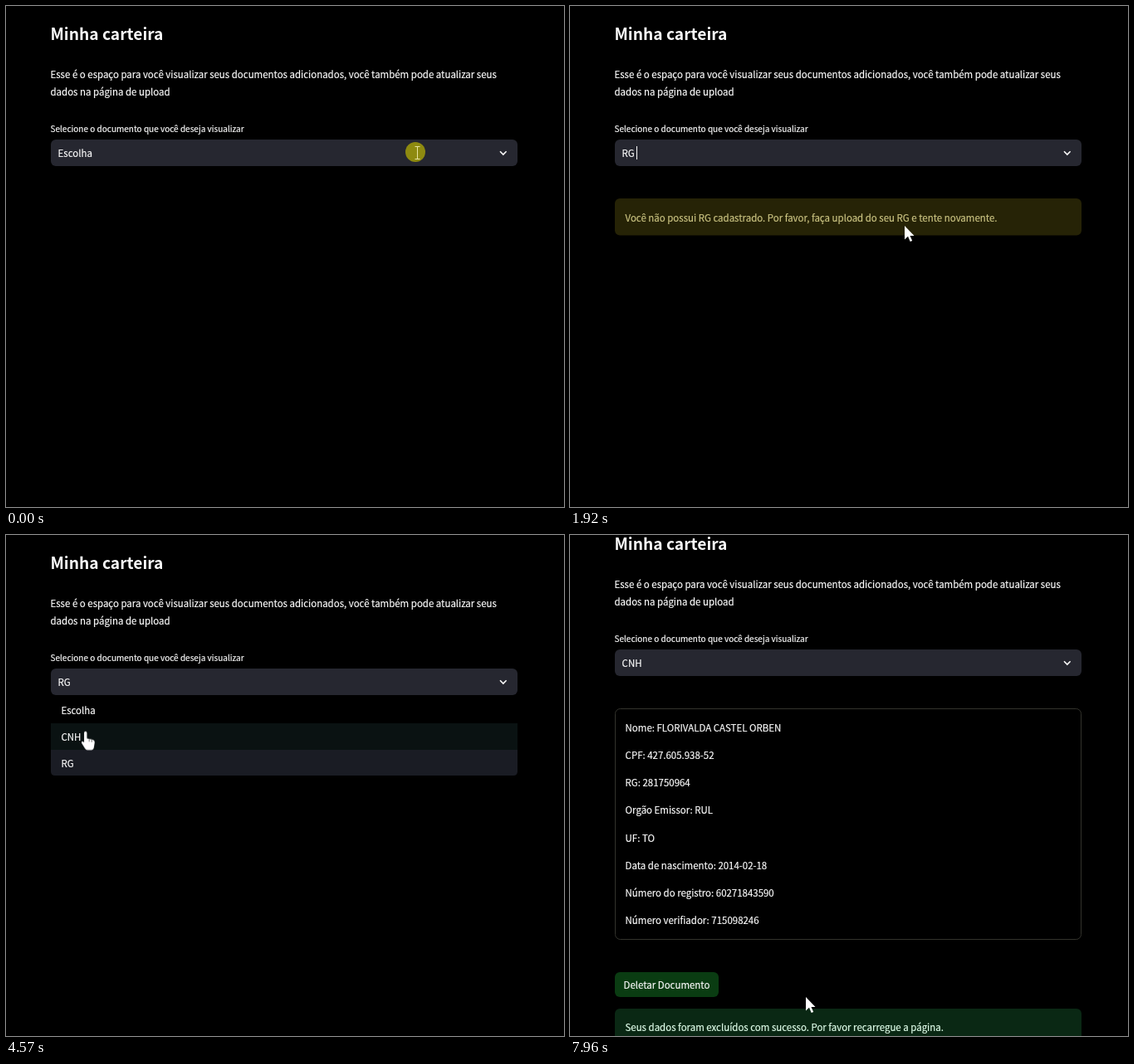
An HTML page that plays this animation: 672x604 px, repeating every 8 s.

```html
<!DOCTYPE html>
<html lang="pt-BR">
<head>
<meta charset="utf-8">
<title>Minha carteira</title>
<style>
html, body { margin: 0; width: 100%; height: 100%; overflow: hidden; background: #000; }
svg { display: block; width: 100%; height: 100%; }
text {
  font: 11.46px "Noto Sans CJK JP", "Noto Sans CJK SC", "Noto Sans CJK KR", "Noto Sans", sans-serif;
  color: #fafafa; fill: currentColor; stroke: currentColor; stroke-width: .2; white-space: pre;
}
.title { font-size: 19.2px; font-weight: 700; stroke: none; }
.small { font-size: 10.03px; }
.field { fill: #262730; }
.line { fill: none; stroke: #fafafa; }

/* Switched parts: hard on and off within the 8 s loop */
.timed { animation: 8s step-end infinite; }
.choose { animation-name: choose; }
.rg { animation-name: rg; }
.cnh { animation-name: cnh; }
.caret { animation-name: caret; }
.popup { animation-name: popup; }
.row-cnh { animation-name: row-cnh; fill: #0a1212; }
.row-rg { animation-name: row-rg; fill: #1a1c24; }
.warning { animation-name: warning; }
.details { animation-name: details; }
.tooltip { animation-name: tooltip; }
.success { animation-name: success; }
.press { animation-name: press; fill: #8e8a10; }
.ibeam { animation-name: ibeam; }
.hand { animation-name: hand; }
.arrow { animation-name: arrow; }
.button { animation-name: button; }

@keyframes choose { 0% { opacity: 1 } 18.5%, 100% { opacity: 0 } }
@keyframes rg { 0%, 63.5%, 100% { opacity: 0 } 18.5% { opacity: 1 } }
@keyframes cnh { 0% { opacity: 0 } 63.5%, 100% { opacity: 1 } }
@keyframes caret { 0%, 27.3%, 39.9%, 100% { opacity: 0 } 21.1%, 33.6% { opacity: 1 } }
@keyframes popup { 0%, 18.5%, 63.5%, 100% { opacity: 0 } 2%, 49% { opacity: 1 } }
@keyframes row-cnh { 0%, 18.5%, 100% { opacity: 0 } 8.9%, 55.6% { opacity: 1 } }
@keyframes row-rg { 0% { opacity: 0 } 12.7%, 100% { opacity: 1 } }
@keyframes warning { 0%, 65%, 100% { opacity: 0 } 22.3% { opacity: 1 } }
@keyframes details { 0% { opacity: 0 } 67%, 100% { opacity: 1 } }
@keyframes tooltip { 0%, 90.4%, 100% { opacity: 0 } 81.3% { opacity: 1 } }
@keyframes success { 0% { opacity: 0 } 86.2%, 100% { opacity: 1 } }
@keyframes press {
  0%, 16.9%, 47.2%, 61.5%, 84.7% { opacity: 1 }
  2%, 18.5%, 49%, 63.1%, 86.2%, 100% { opacity: 0 }
}
@keyframes ibeam { 0%, 40.5% { opacity: 1 } 5.4%, 51.6%, 100% { opacity: 0 } }
@keyframes hand { 0%, 18.5%, 63.1%, 89.4%, 100% { opacity: 0 } 5.4%, 51.6%, 80.4% { opacity: 1 } }
@keyframes arrow { 0%, 40.5%, 80.4% { opacity: 0 } 18.5%, 63.1%, 89.4%, 100% { opacity: 1 } }
@keyframes button { 0% { fill: #0a4a12 } 80.4% { fill: #06260a } 89.4%, 100% { fill: #0a3c12 } }

/* Parts that move or fade */
.warning rect { animation: warn-box 8s linear infinite; }
.warning text { animation: warn-text 8s linear infinite; }
.page { animation: scroll 8s step-end infinite; }
.cursor { animation: travel 8s linear infinite; }

@keyframes warn-box { 0%, 24% { fill: #262306 } 27.4%, 100% { fill: #332807 } }
@keyframes warn-text { 0%, 24% { color: #c9c280 } 27.4%, 100% { color: #ffffc2 } }
@keyframes scroll {
  0% { transform: none }
  97% { transform: translateY(-12px) }
  97.9%, 100% { transform: translateY(-23px) }
}
@keyframes travel {
  0%, 3.2% { transform: translate(495px, 177px) }
  7.5% { transform: translate(470px, 215px) }
  12.5% { transform: translate(412px, 258px) }
  14.9% { transform: translate(408px, 263px) }
  18.5%, 31.5% { transform: translate(403px, 265px) }
  34.8% { transform: translate(500px, 275px) }
  38.1% { transform: translate(440px, 215px) }
  41.4% { transform: translate(260px, 185px) }
  46.2%, 50% { transform: translate(127px, 180px) }
  53.8% { transform: translate(110px, 215px) }
  58.1% { transform: translate(92px, 243px) }
  67.5% { transform: translate(88px, 243px) }
  72.5%, 74.6% { transform: translate(80px, 227px) }
  78.8% { transform: translate(95px, 480px) }
  81.3% { transform: translate(101px, 560px) }
  83.8%, 88.8% { transform: translate(102px, 567px) }
  91.9% { transform: translate(180px, 575px) }
  95%, 100% { transform: translate(284px, 557px) }
}
</style>
</head>
<body>
<svg viewBox="0 0 672 604">
  <g class="page">
    <text class="title" x="53.5" y="41">Minha carteira</text>
    <text x="53.5" y="87">Esse é o espaço para você visualizar seus documentos adicionados, você também pode atualizar seus</text>
    <text x="53.5" y="108">dados na página de upload</text>
    <text class="small" x="53.5" y="152">Selecione o documento que você deseja visualizar</text>

    <rect class="field" x="54" y="161" width="562" height="32" rx="6"/>
    <path class="line" d="M595 175.2l3.8 3.8 3.8-3.8" stroke-width="1.6"/>
    <text class="timed choose" x="62.6" y="182">Escolha</text>
    <text class="timed rg" x="62.6" y="182">RG</text>
    <text class="timed cnh" x="62.6" y="182">CNH</text>
    <path class="line timed caret" d="M80.5 169v16"/>

    <g class="timed warning">
      <rect x="54" y="232" width="562" height="44.5" rx="6"/>
      <text x="66.5" y="260">Você não possui RG cadastrado. Por favor, faça upload do seu RG e tente novamente.</text>
    </g>

    <g class="timed details">
      <rect x="54.5" y="232.5" width="561" height="278" rx="6" fill="none" stroke="#33332c"/>
      <text x="66.6" y="260">Nome: FLORIVALDA CASTEL ORBEN</text>
      <text x="66.6" y="293">CPF: 427.605.938-52</text>
      <text x="66.6" y="326">RG: 281750964</text>
      <text x="66.6" y="359">Orgão Emissor: RUL</text>
      <text x="66.6" y="393">UF: TO</text>
      <text x="66.6" y="426">Data de nascimento: 2014-02-18</text>
      <text x="66.6" y="459">Número do registro: 60271843590</text>
      <text x="66.6" y="492">Número verifiador: 715098246</text>
      <rect class="timed button" x="54" y="550" width="125" height="30" rx="6"/>
      <text x="116.5" y="570" text-anchor="middle">Deletar Documento</text>
    </g>

    <g class="timed success">
      <rect x="54" y="594" width="562" height="45" rx="6" fill="#0a2814"/>
      <text x="66.5" y="621" style="color:#dffde9">Seus dados foram excluídos com sucesso. Por favor recarregue a página.</text>
    </g>

    <g class="timed tooltip">
      <rect class="field" x="-20" y="514" width="275" height="28" rx="4"/>
      <text class="small" x="1.6" y="532">clicar você irá deletar os dados do documento salvo.</text>
    </g>

    <g class="timed popup">
      <rect x="54" y="195" width="562" height="95" rx="5"/>
      <rect class="timed row-cnh" x="54" y="227" width="562" height="32"/>
      <path class="timed row-rg" d="M54 259h562v26q0 5-5 5H59q-5 0-5-5z"/>
      <text x="66.4" y="216">Escolha</text>
      <text x="66.4" y="248">CNH</text>
      <text x="66.4" y="280">RG</text>
    </g>
  </g>

  <g class="cursor">
    <circle class="timed press" cx="-2" cy="-1" r="12"/>
    <path class="timed ibeam" d="M-2.5-7.5h6M.5-7.5v15M-2.5 7.5h6" fill="none" stroke="#e8e4a0"/>
    <g class="timed hand">
      <path d="M-2 1.8a1.7 1.7 0 0 1 3.4 0V8.5l7 1.6q2.6.7 2.4 3.2l-.8 5q-.3 3.7-3 4.2h-5q-1.8 0-3-2l-4-6.5q-.6-2 1.2-2l1.8 1.3z" fill="#fff"/>
      <path d="M4.2 9.4v3M7.2 10v3" stroke="#000" stroke-width=".6"/>
    </g>
    <path class="timed arrow" d="M0 0V16.5l4-3.7 2.7 6.2 2.5-1.1-2.7-6H11.5z" fill="#fff"/>
  </g>
</svg>
</body>
</html>
```
